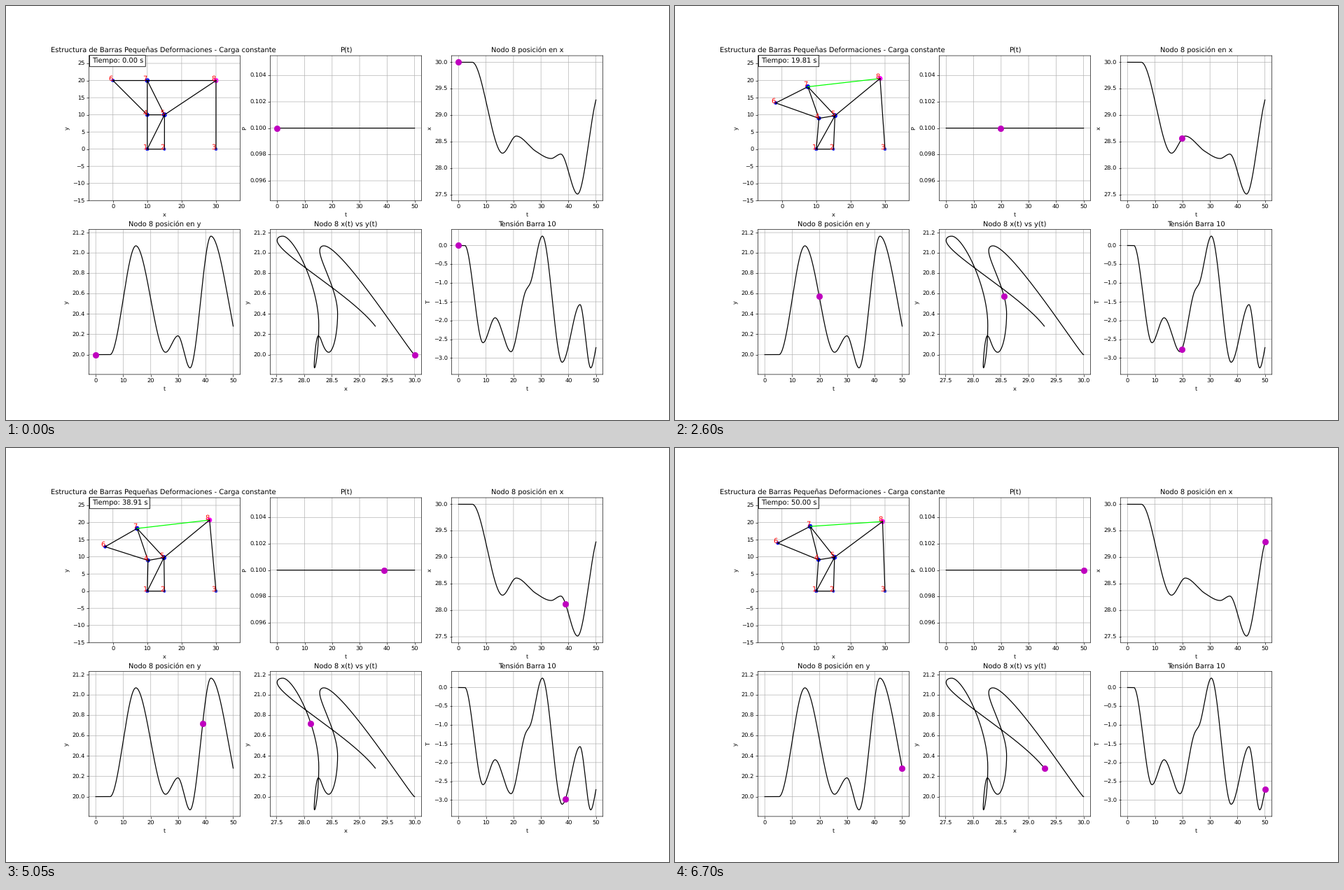
These frames come from a looping animation (947x592 px, 6.75 s). A matplotlib script:

```python
import numpy as np
import matplotlib.pyplot as plt
from matplotlib.animation import FuncAnimation

FRAMES, INTERVAL = 135, 50
T_END = 50.0

# Soft, unsnapped drawing
plt.rcParams.update({"path.snap": False, "text.hinting": "none"})


def curve(*keys):
    """Cubic Hermite curve through keys (t, value, slope); slope is 0 if left out."""
    t, v, d = np.array([(*k, 0)[:3] for k in keys], float).T

    def f(s):
        s = np.clip(s, t[0], t[-1])
        i = np.clip(np.searchsorted(t, s) - 1, 0, len(t) - 2)
        h = t[i + 1] - t[i]
        u = (s - t[i]) / h
        ease = u * u * (3 - 2 * u)
        return (v[i] + (v[i + 1] - v[i]) * ease
                + h * u * (1 - u) * (d[i] * (1 - u) - d[i + 1] * u))
    return f


# Turning points of the response
x8 = curve((0, 30), (5, 30), (16, 28.285), (21, 28.608), (28, 28.325, -.033),
           (33.7, 28.185), (37.2, 28.268), (43.3, 27.515), (50, 29.29, .2))
y8 = curve((0, 20), (5.2, 20), (14.6, 21.07), (25.4, 20.023), (29.9, 20.185),
           (34.3, 19.87), (41.9, 21.165), (50, 20.28, -.14))
tension = curve((0, 0), (2.3, 0), (8.9, -2.59), (13.3, -1.925), (19.1, -2.83),
                (24, -1.3, .25), (26, -1.02, .15), (30.5, .25), (37.7, -3.11),
                (44.2, -1.575), (48.1, -3.26), (50, -2.72, .4))
y6 = curve((0, 20), (13, 12.1), (16, 12.1), (29.3, 18.95), (42, 11.9),
           (45, 12), (50, 14, .6))


def load(t):
    return 0.1 + 0 * t


def time(t):
    return t


def nodes(t):
    """Node positions; the inner nodes follow node 8 and bar 10."""
    a, b, pull, h6 = x8(t), y8(t), tension(t), y6(t)
    lift = y8(t - .5) - 20
    x5, y5 = a - 15 + 2.9 * lift, 10 - .38 * lift
    x4, y4 = x5 - 5 - .12 * pull, 10 + .25 * pull - .5 * lift
    y7 = 20 + .12 * pull - 2.3 * lift
    x7 = a - np.sqrt((20 - pull / 2.4)**2 - (b - y7)**2)
    x6 = x7 - 10 + .1 * (20 - h6)
    return np.array([(10, 0), (15, 0), (30, 0), (x4, y4), (x5, y5),
                     (x6, h6), (x7, y7), (a, b)], float)


BARS = [(0, 1), (0, 3), (0, 4), (1, 4), (3, 4), (3, 5), (3, 6), (4, 6), (5, 6),
        (6, 7), (4, 7), (2, 7)]
BAR_10 = BARS.index((6, 7))


def clock(k):
    """Simulated time: a slow start, then a slightly falling rate, on a grid."""
    t = np.interp(k, [0, 14, 32, 52, 82, 101, 114, 134],
                  [0, 2.6, 11.6, 19.8, 31.7, 38.9, 43.7, 50])
    return min(round(t * 10) * 0.100035, T_END)


fig, axes = plt.subplots(2, 3, figsize=(16, 10), dpi=59.2)
axes = axes.ravel()
truss = axes[0]


def setup(ax, title, xlabel, ylabel, ylim, xlim=(-2.5, 52.5)):
    ax.set(title=title, xlabel=xlabel, ylabel=ylabel, xlim=xlim, ylim=ylim)
    ax.grid(True)


X_LIM, Y_LIM = (27.391, 30.124), (19.805, 21.23)
setup(truss, "Estructura de Barras Pequeñas Deformaciones - Carga constante ",
      "x", "y", (-15, 27.24), (-7, 37))
setup(axes[1], "P(t)", "t", "P", (.0945, .1055))
setup(axes[2], "Nodo 8 posición en x", "t", "x", X_LIM)
setup(axes[3], "Nodo 8 posición en y", "t", "y", Y_LIM)
setup(axes[4], "Nodo 8 x(t) vs y(t)", "x", "y", Y_LIM, X_LIM)
setup(axes[5], "Tensión Barra 10", "t", "T", (-3.436, .425))

PLOTS = [(time, load), (time, x8), (time, y8), (x8, y8), (time, tension)]
ts = np.linspace(0, T_END, 500)
dots = []
for ax, (fx, fy) in zip(axes[1:], PLOTS):
    ax.plot(fx(ts), fy(ts), "k")
    dots.append(ax.scatter([0], [0], s=100, c="m", lw=1, zorder=3))

# Node size grows with the length of the bars that meet there
rest = nodes(0.0)
size = np.zeros(8)
for i, j in BARS:
    size[[i, j]] += np.hypot(*(rest[i] - rest[j]))
joints = truss.scatter(*rest.T, s=size, c=["blue"] * 7 + ["magenta"])
bars = [truss.plot([], [], "k")[0] for _ in BARS]
tags = [truss.text(0, 0, str(n + 1), color="r", size=12, ha="right")
        for n in range(8)]
timer = truss.text(.02, .95, "", size=12, transform=truss.transAxes,
                   bbox=dict(facecolor="white"))


def update(k):
    t = clock(k)
    p = nodes(t)
    joints.set_offsets(p)
    for bar, (i, j) in zip(bars, BARS):
        bar.set_data(*p[[i, j]].T)
    bars[BAR_10].set_color((0, float(np.clip(-.4 * tension(t), 0, 1)), 0))
    for tag, xy in zip(tags, p):
        tag.set_position(xy)
    for dot, (fx, fy) in zip(dots, PLOTS):
        dot.set_offsets([(fx(t), fy(t))])
    timer.set_text(f"Tiempo: {t:.2f} s")
    return [joints, *bars, *tags, *dots, timer]


anim = FuncAnimation(fig, update, frames=FRAMES, interval=INTERVAL,
                     init_func=lambda: update(0), repeat=True, repeat_delay=0)
plt.show()
```
